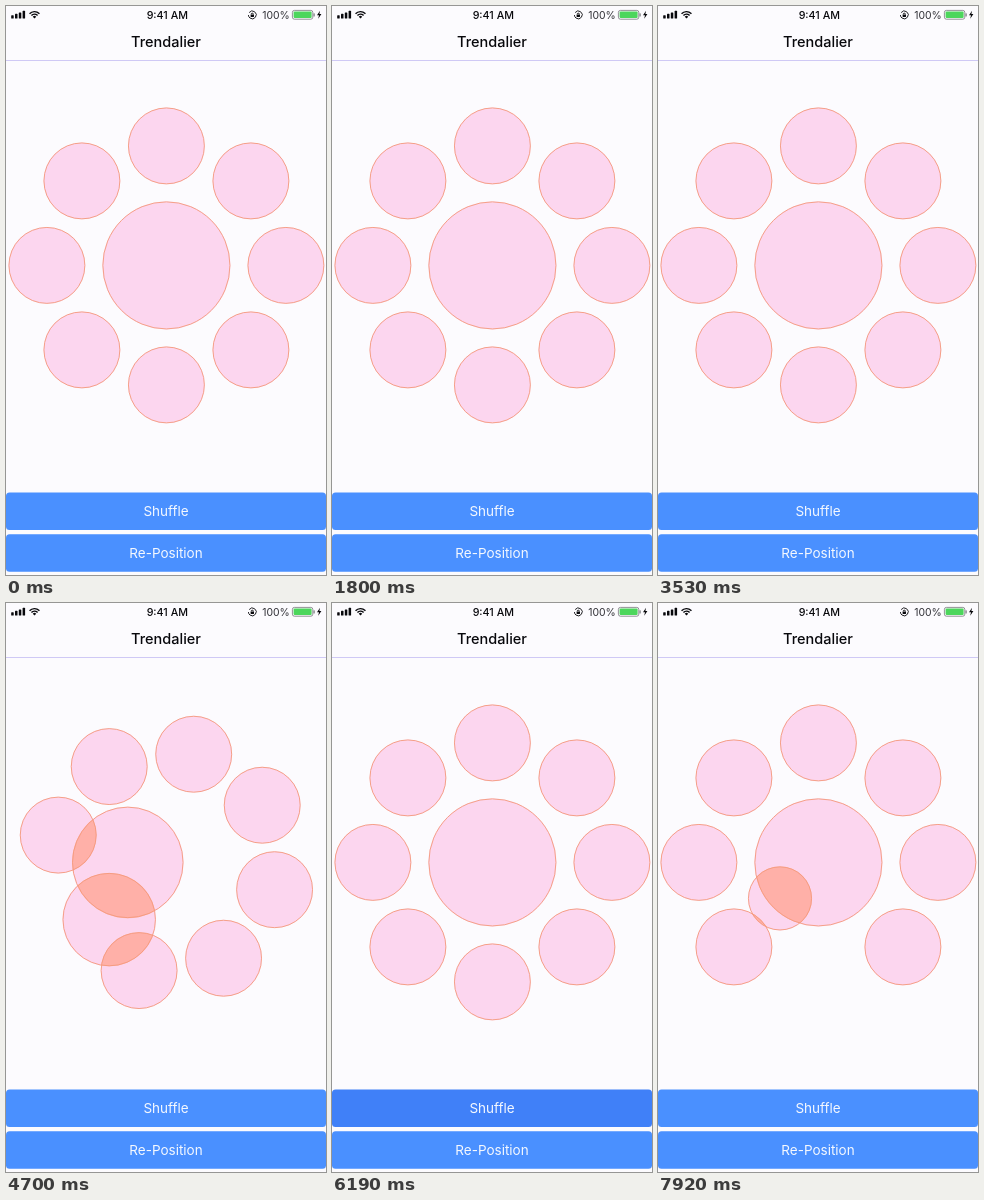
These frames come from a looping animation (320x569 px, 8000 ms). An HTML page with a canvas:

```html
<!DOCTYPE html>
<html lang="en">
<head>
<meta charset="utf-8">
<title>Circle layout</title>
<style>
html, body { margin: 0; width: 100%; height: 100%; overflow: hidden; background: #fcfbfe; }
canvas { display: block; width: 320px; height: 569px; }
</style>
</head>
<body>
<canvas id="stage"></canvas>
<script>
const W = 320, H = 569, LOOP = 8000;
const canvas = document.getElementById('stage');
const ctx = canvas.getContext('2d');
const ratio = window.devicePixelRatio || 1;
canvas.width = W * ratio;
canvas.height = H * ratio;

const FONT = 'Inter, Roboto, sans-serif';
const INK = '#08080c';
const BLUE = '#4a90ff', BLUE_DOWN = '#4080f8';
const PINK = '#fcd6ef', OVERLAP = '#ffb0a8', EDGE = '#f49a7c';

const CENTER = { x: 160.4, y: 259.4, r: 64 };
const RING = 119.5, SMALL = 38.4;

// Eight places clockwise from the left, then the middle.
const slots = Array.from({ length: 8 }, (_, i) => {
  const a = Math.PI + i * Math.PI / 4;
  return { x: CENTER.x + RING * Math.cos(a), y: CENTER.y + RING * Math.sin(a), r: SMALL };
}).concat(CENTER);
const BOTTOM = 6;

const MOVE = 500;
const moves = [4500, 5400, 6290];
const presses = [[4400, 4500], [5300, 5400], [6190, 6290], [7760, 7840]];
const DEPART = { from: 7800, to: 7920, x: 122, y: 295.4, r: 32 };

const clamp = v => Math.max(0, Math.min(1, v));
const ease = p => p < 0.5 ? 2 * p * p : 1 - 2 * (1 - p) * (1 - p);
const mix = (a, b, p) => ({
  x: a.x + (b.x - a.x) * p,
  y: a.y + (b.y - a.y) * p,
  r: a.r + (b.r - a.r) * p
});

function circlesAt(t) {
  const start = moves.find(m => t >= m && t < m + MOVE);
  const p = start === undefined ? 0 : ease((t - start) / MOVE);
  const list = slots.map((s, i) => mix(s, slots[(i + 1) % slots.length], p));
  const q = clamp((t - DEPART.from) / (DEPART.to - DEPART.from));
  list[BOTTOM] = mix(list[BOTTOM], DEPART, ease(q));
  return list;
}

function trace(c, inset = 0) {
  ctx.beginPath();
  ctx.arc(c.x, c.y, c.r - inset, 0, Math.PI * 2);
}

function drawCircles(list) {
  ctx.fillStyle = PINK;
  for (const c of list) { trace(c); ctx.fill(); }
  ctx.fillStyle = OVERLAP;
  list.forEach((a, i) => list.slice(i + 1).forEach(b => {
    if (Math.hypot(a.x - b.x, a.y - b.y) >= a.r + b.r) return;
    ctx.save();
    trace(a);
    ctx.clip();
    trace(b);
    ctx.fill();
    ctx.restore();
  }));
  ctx.strokeStyle = EDGE;
  ctx.lineWidth = 0.9;
  for (const c of list) { trace(c, 0.45); ctx.stroke(); }
}

function box(x, y, w, h, r, color) {
  ctx.fillStyle = color;
  ctx.beginPath();
  ctx.roundRect(x, y, w, h, r);
  ctx.fill();
}

function label(text, x, y, size, weight, color) {
  ctx.font = `${weight} ${size}px ${FONT}`;
  ctx.textAlign = 'center';
  ctx.textBaseline = 'alphabetic';
  ctx.fillStyle = color;
  ctx.fillText(text, x, y);
}

function drawWifi(x, y) {
  ctx.strokeStyle = INK;
  ctx.lineWidth = 1.4;
  for (const r of [4.2, 6.8]) {
    ctx.beginPath();
    ctx.arc(x, y, r, -Math.PI * 0.76, -Math.PI * 0.24);
    ctx.stroke();
  }
  ctx.fillStyle = INK;
  ctx.beginPath();
  ctx.moveTo(x, y);
  ctx.arc(x, y, 2.4, -Math.PI * 0.76, -Math.PI * 0.24);
  ctx.fill();
}

function drawRotationLock(x, y) {
  ctx.strokeStyle = INK;
  ctx.lineWidth = 0.9;
  ctx.beginPath();
  ctx.arc(x, y, 3.9, -2.5, 3.1);
  ctx.stroke();
  box(x - 1.7, y - 0.5, 3.4, 2.5, 0.4, INK);
  ctx.beginPath();
  ctx.arc(x, y - 0.6, 1.1, Math.PI, 0);
  ctx.stroke();
}

function drawBattery() {
  ctx.strokeStyle = '#77777c';
  ctx.lineWidth = 0.8;
  ctx.beginPath();
  ctx.roundRect(286.4, 4.4, 20.4, 8.8, 2);
  ctx.stroke();
  box(287.6, 5.6, 18, 6.4, 1, '#4cd65c');
  box(307.5, 7.2, 1.2, 3.2, 0.5, '#77777c');
  ctx.fillStyle = INK;
  ctx.beginPath();
  [[314, 4.8], [311, 9.2], [313, 9.2], [312.2, 12.8], [315.4, 8], [313.4, 8]]
    .forEach(([x, y]) => ctx.lineTo(x, y));
  ctx.fill();
}

function drawHeader() {
  [3.4, 4.8, 6.2, 7.8].forEach((h, i) => box(5.2 + i * 3.8, 12.6 - h, 2.5, h, 0.6, INK));
  drawWifi(28.5, 12.4);
  label('9:41 AM', 161.3, 12.6, 10.7, 500, INK);
  drawRotationLock(246.3, 8.9);
  label('100%', 270, 12.6, 10.4, 400, '#303036');
  drawBattery();
  label('Trendalier', 160, 40.5, 14.5, 500, INK);
  ctx.fillStyle = '#cfc9f5';
  ctx.fillRect(0, 54, W, 1);
}

function drawButton(text, y, color) {
  box(0, y, W, 37.5, 3.5, color);
  label(text, 160, y + 23.8, 13.5, 400, '#f4f8ff');
}

function draw(t) {
  ctx.setTransform(ratio, 0, 0, ratio, 0, 0);
  ctx.fillStyle = '#fcfbfe';
  ctx.fillRect(0, 0, W, H);
  drawHeader();
  drawCircles(circlesAt(t));
  const down = presses.some(([a, b]) => t >= a && t < b);
  drawButton('Shuffle', 486.4, down ? BLUE_DOWN : BLUE);
  drawButton('Re-Position', 528.2, BLUE);
}

const begin = performance.now();
function tick() {
  draw((performance.now() - begin) % LOOP);
  requestAnimationFrame(tick);
}
tick();
</script>
</body>
</html>
```
